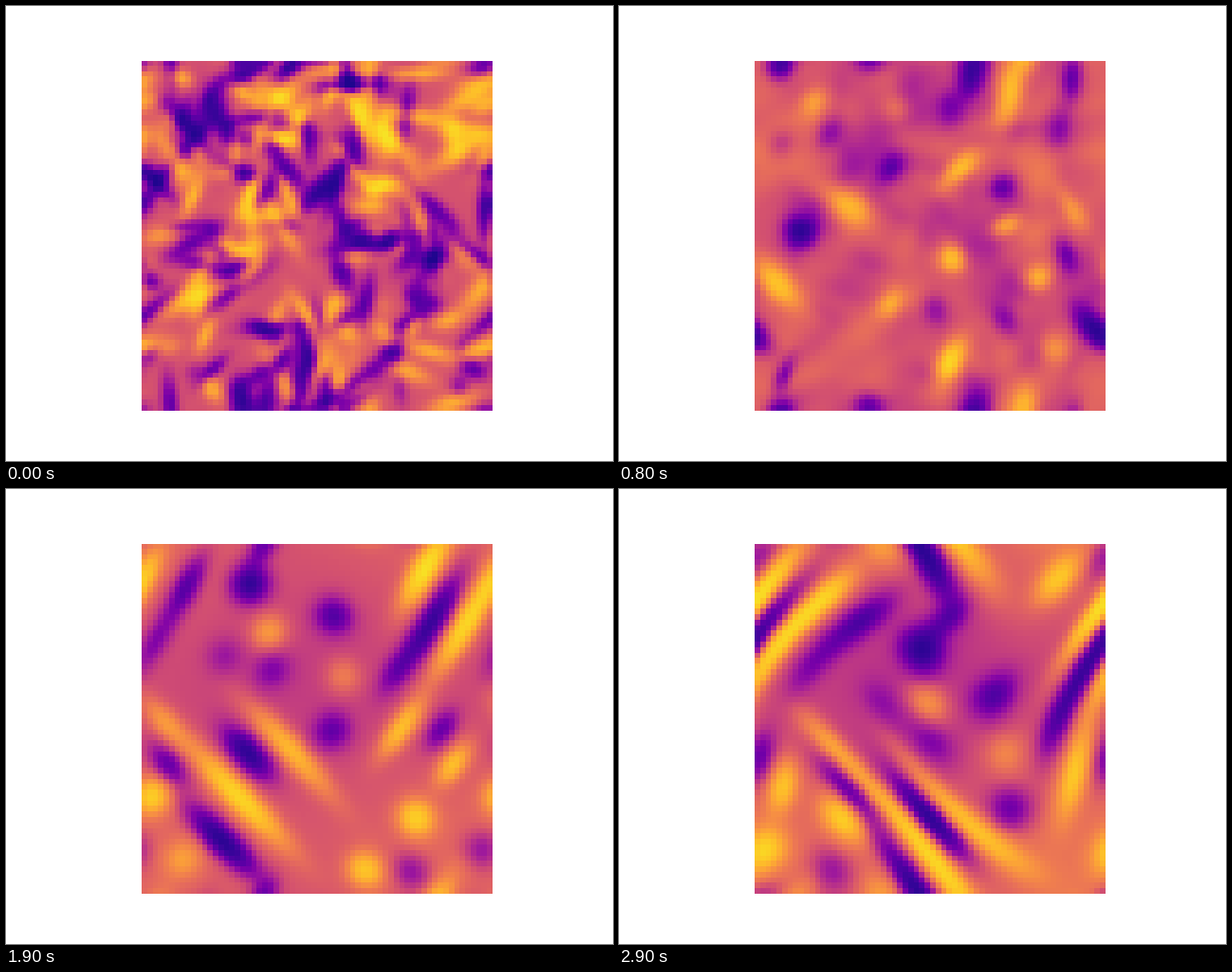
A matplotlib script for the animation above (4 s loop, 640 by 480 pixels).

```python
import numpy as np
import matplotlib.pyplot as plt
from matplotlib.animation import FuncAnimation

FRAMES, INTERVAL = 40, 100
LAST_MOVING = 29
CELLS, LEFT, TOP, SIDE = 64, 143.2, 57.6, 369.6
WAVE = 2 * np.pi / SIDE
REFERENCE = 21  # step at which the large eddies are described

# Large eddies: streaks are (x, y, length, strength), spots (x, y, strength)
FALLING = [(262, 335, 75, .45), (312, 290, 68, .34), (178, 250, 36, .2),
           (268, 290, 36, -.55), (247, 380, 50, -.6), (185, 295, 28, -.32)]
RISING = [(457, 95, 48, .52), (495, 150, 62, .46), (428, 265, 38, .36),
          (485, 297, 26, .34), (163, 95, 34, .25), (460, 150, 60, -.5),
          (205, 108, 36, -.36), (168, 165, 40, -.22), (470, 262, 24, -.3),
          (287, 75, 22, -.28), (420, 205, 30, -.2)]
SPOTS = [(450, 358, .4), (170, 328, .4), (397, 418, .36), (288, 165, .24),
         (205, 395, .2), (365, 215, .16), (272, 112, -.52), (357, 152, -.36),
         (355, 273, -.3), (290, 205, -.2), (240, 185, -.14), (150, 385, -.2),
         (445, 415, -.2)]

large = [(x, y, length, 14, 47, s) for x, y, length, s in FALLING]
large += [(x, y, length, 13, -58, s) for x, y, length, s in RISING]
large += [(x, y, 20, 20, 0, s) for x, y, s in SPOTS]

rng = np.random.default_rng(4)
small = [(*rng.uniform(0, SIDE, 2), rng.uniform(12, 36), rng.uniform(7, 11),
          rng.uniform(0, 180), rng.choice([-.32, .28])) for _ in range(150)]

axis = (np.arange(CELLS) + .5) * SIDE / CELLS
GRID = np.meshgrid(LEFT + axis, TOP + axis)


def velocity(x, y, t):
    """Mean drift plus a large shear that builds up early on."""
    shear = min(1, (t + 6) / 22)
    return (6.9 + 2.3 * shear * np.cos(WAVE * (y - 390)),
            5.2 + 3.5 * shear * np.cos(WAVE * (x - 350)))


def carry(t, goal):
    """Where the fluid now at each cell is at step `goal`."""
    x, y = GRID
    step = np.sign(goal - t)
    while t != goal:
        u, v = velocity(x, y, t)
        u, v = velocity(x + u * step / 2, y + v * step / 2, t + step / 2)
        x, y, t = x + u * step, y + v * step, t + step
    return x, y


def wrap(d):
    return (d + SIDE / 2) % SIDE - SIDE / 2


def eddies(group, x, y, size):
    total = np.zeros_like(x)
    for cx, cy, length, width, angle, strength in group:
        c, s = np.cos(np.radians(angle)), np.sin(np.radians(angle))
        dx, dy = wrap(x - cx), wrap(y - cy)
        along, across = dx * c + dy * s, dy * c - dx * s
        total += strength * np.exp(-((along / length) ** 2
                                     + (across / width) ** 2) / size ** 2)
    return total


def field(t):
    # Eddies widen by diffusion; the fine ones die out first.
    growth = np.sqrt((t + 8) / (REFERENCE + 8))
    total = (1 - .6 * np.exp(-t / 4)) * eddies(
        large, *carry(t, REFERENCE), growth)
    fine = np.exp(-t / 4)
    if fine > .01:
        total += fine * eddies(small, *carry(t, 0), 1 + t / 12)
    x, y = GRID
    base = .54 + t / LAST_MOVING * (.07 * np.cos(WAVE * (y - 390))
                                    + .04 * np.cos(WAVE * (x - 495)))
    return base + np.tanh(total / .4) * np.where(total > 0, 1 - base, base)


fig, ax = plt.subplots(figsize=(6.4, 4.8), dpi=100)
ax.axis("off")
image = ax.imshow(field(0), cmap="plasma", vmin=0, vmax=1,
                  interpolation="nearest")


def update(frame):
    image.set_data(field(min(frame, LAST_MOVING)))
    return [image]


anim = FuncAnimation(fig, update, frames=FRAMES, interval=INTERVAL,
                     repeat=True, repeat_delay=0)
plt.show()
```
